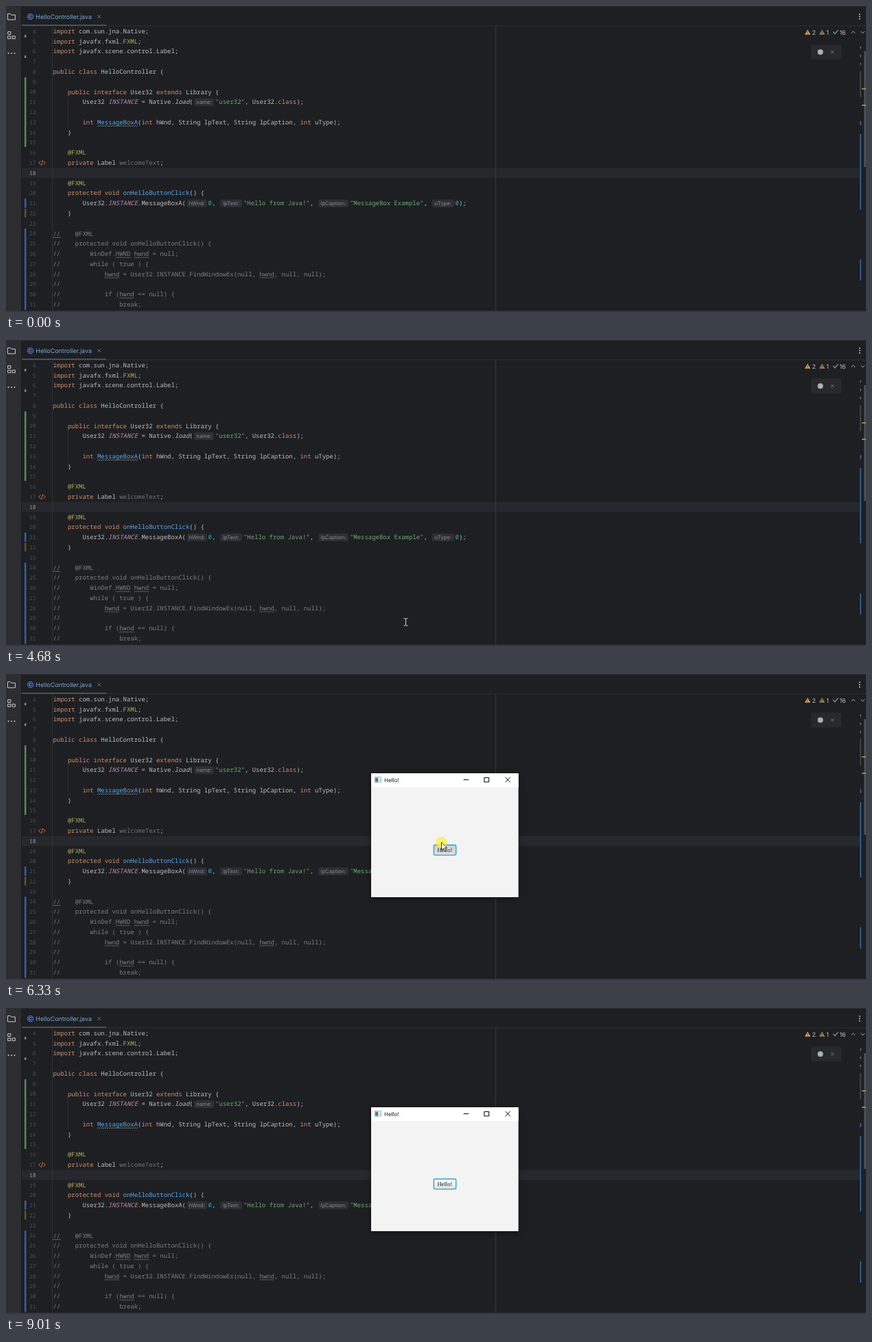
An HTML page for the animation above (9.76 s loop, 1253 by 447 pixels).

```html
<!DOCTYPE html>
<html lang="en">
<head>
<meta charset="utf-8">
<title>Message box demo</title>
<style>
  html, body { margin: 0; width: 100%; height: 100%; overflow: hidden; background: #1e1f22; }
  svg { display: block; width: 100vw; height: 100vh; }
  text { white-space: pre; text-rendering: geometricPrecision; }
  .code { font: 8.96px "Noto Sans Mono", "DejaVu Sans Mono", monospace; }
  .num { font: 7.9px "Noto Sans Mono", "DejaVu Sans Mono", monospace; text-anchor: end; }
  .ui { font-family: Inter, Roboto, sans-serif; }
  .win { font-family: "Open Sans", "Noto Sans", sans-serif; }
  .line { fill: none; stroke-linecap: round; stroke-linejoin: round; }
</style>
</head>
<body>
<svg id="stage" viewBox="0 0 1253 447" preserveAspectRatio="none" xmlns="http://www.w3.org/2000/svg"></svg>
<script>
const LOOP = 9760, STEP = 69, ANCHOR = 5500;
const CW = 5.376, X0 = 68.5;
const COLORS = {
  t: '#bcbec4', k: '#cf8e6d', s: '#6aab73', a: '#b3ae60', f: '#56a8f5',
  n: '#2aacb8', c: '#7a7e85', u: '#6f737a', p: '#c08bb8'
};
const esc = s => s.replace(/&/g, '&amp;').replace(/</g, '&lt;').replace(/>/g, '&gt;');
const mid = n => 37 + (n - 4) * 14.78;
const col = c => X0 + c * CW;

const rect = (x, y, w, h, fill, extra = '') =>
  `<rect x="${x}" y="${y}" width="${w}" height="${h}" fill="${fill}" ${extra}/>`;
const line = (d, stroke, w = 1, extra = '') =>
  `<path class="line" d="${d}" stroke="${stroke}" stroke-width="${w}" ${extra}/>`;
const label = (x, y, s, fill, size, cls = 'ui', extra = '') =>
  `<text class="${cls}" x="${x}" y="${y}" fill="${fill}" font-size="${size}" ${extra}>${esc(s)}</text>`;

// Code run: pairs of colour key and text; a capital key means italic.
function row(n, x, ...parts) {
  let out = '';
  for (let i = 0; i < parts.length; i += 2) {
    const key = parts[i], low = key.toLowerCase();
    out += `<tspan fill="${COLORS[low]}"${key !== low ? ' font-style="italic"' : ''}>${esc(parts[i + 1])}</tspan>`;
  }
  return `<text class="code" x="${x}" y="${mid(n) + 2.9}">${out}</text>`;
}
function chip(n, x, w, s) {
  return rect(x, mid(n) - 5.8, w, 11.6, '#2d2f34', 'rx="3"') +
    label(x + w / 2, mid(n) + 2.6, s, '#868a91', 7.7, 'ui', 'text-anchor="middle"');
}
function wave(n, x, w, color) {
  let d = `M${x} ${mid(n) + 6}`;
  for (let i = 1; i * 1.5 <= w; i++) d += `l1.5 ${i % 2 ? -1.5 : 1.5}`;
  return line(d, color, 0.75);
}

function editorCode() {
  const c4 = col(4), c8 = col(8);
  const comments = [
    [24, '//    @FXML'],
    [25, '//    protected void onHelloButtonClick() {'],
    [26, '//        WinDef.HWND hwnd = null;'],
    [27, '//        while ( true ) {'],
    [28, '//            hwnd = User32.INSTANCE.FindWindowEx(null, hwnd, null, null);'],
    [29, '//'],
    [30, '//            if (hwnd == null) {'],
    [31, '//                break;']
  ];
  const waves = [[26, 17], [26, 22], [28, 14], [28, 56], [30, 18]];
  return [
    row(4, X0, 'k', 'import ', 't', 'com.sun.jna.Native;'),
    row(5, X0, 'k', 'import ', 't', 'javafx.fxml.', 'a', 'FXML', 't', ';'),
    row(6, X0, 'k', 'import ', 't', 'javafx.scene.control.Label;'),
    row(8, X0, 'k', 'public class ', 't', 'HelloController {'),
    row(10, c4, 'k', 'public interface ', 't', 'User32 ', 'k', 'extends ', 't', 'Library {'),
    row(11, c8, 't', 'User32 ', 'P', 'INSTANCE', 't', ' = Native.', 'T', 'load', 't', '('),
    chip(11, 274, 29, 'name:'),
    row(11, 305, 's', '"user32"', 't', ', User32.', 'k', 'class', 't', ');'),
    row(13, c8, 'k', 'int ', 'f', 'MessageBoxA', 't', '(', 'k', 'int ', 't',
      'hWnd, String lpText, String lpCaption, ', 'k', 'int ', 't', 'uType);'),
    wave(13, col(12), 59, '#8f8b72'),
    row(14, c4, 't', '}'),
    row(16, c4, 'a', '@FXML'),
    row(17, c4, 'k', 'private ', 't', 'Label ', 'u', 'welcomeText', 't', ';'),
    row(19, c4, 'a', '@FXML'),
    row(20, c4, 'k', 'protected void ', 'f', 'onHelloButtonClick', 't', '() {'),
    row(21, c8, 't', 'User32.', 'P', 'INSTANCE', 't', '.MessageBoxA('),
    chip(21, 263.5, 29.5, 'hWnd:'),
    row(21, 294.5, 'n', '0', 't', ','),
    chip(21, 312, 32, 'lpText:'),
    row(21, 346, 's', '"Hello from Java!"', 't', ','),
    chip(21, 455, 44, 'lpCaption:'),
    row(21, 501, 's', '"MessageBox Example"', 't', ','),
    chip(21, 620.5, 32.5, 'uType:'),
    row(21, 654.5, 'n', '0', 't', ');'),
    row(22, c4, 't', '}'),
    ...comments.map(([n, s]) => row(n, X0, 'c', s)),
    line(`M${X0} ${mid(24) + 5.5}h10.5`, '#7d8060', 0.8),
    ...waves.map(([n, c]) => wave(n, col(c), 21.5, '#549159'))
  ].join('');
}

function gutter() {
  let out = '';
  for (let n = 4; n <= 31; n++)
    out += `<text class="num" x="43.5" y="${mid(n) + 2.8}" fill="${n === 18 ? '#a1a3ab' : '#4b5059'}">${n}</text>`;
  const bars = [
    [104, 102, '#549159'], [281, 14, '#375fad'], [296, 13, '#67551f'], [325, 119, '#375fad'],
    [42, 4, '#868a91'], [72, 4, '#868a91']
  ];
  for (const [y, h, c] of bars) out += rect(27, y, 2.4, h, c, 'rx="1"');
  return out +
    line('M50.3 226.6l-2.6 2.5 2.6 2.5M54.7 226.6l2.6 2.5 -2.6 2.5M53.5 225.6l-2 7', '#d0743c', 1);
}

function chrome() {
  const icon = '#ced0d6';
  const dots = pts => pts.map(([x, y]) => `<circle cx="${x}" cy="${y}" r="0.95" fill="${icon}"/>`).join('');
  const warn = (x, c) => `<path d="M${x} 34.4l4.2 7.4h-8.4z" fill="${c}"/>` +
    rect(x - 0.4, 37, 0.9, 2.4, '#1e1f22') + rect(x - 0.4, 40, 0.9, 0.8, '#1e1f22');
  return [
    rect(0, 0, 22, 447, '#2b2d30'),
    rect(22, 0, 1, 447, '#1a1b1d'),
    rect(0, 0, 1253, 1, '#2b2d30'),
    rect(23, 28.6, 1230, 0.8, '#313338'),
    rect(23, 27.3, 123, 1.7, '#4f5963'),
    rect(0, 445.2, 1253, 1.8, '#36383c'),
    // tool buttons
    line('M2.8 11.4h3.4l1.6 1.7h5.6v6.9h-10.6z', icon),
    line('M3 37.6h3.8v3.8h-3.8zM3 44h3.8v3.8h-3.8zM9.5 44h3.8v3.8h-3.8z', icon),
    dots([[3.5, 69], [8, 69], [12.5, 69]]),
    // tab
    '<circle cx="35.6" cy="15.6" r="4.3" fill="#25324d" stroke="#548af7" stroke-width="0.9"/>',
    line('M37.1 14.3a2 2 0 1 0 0 2.6', '#70a1f5', 0.9),
    label(43.3, 18.7, 'HelloController.java', '#79a8df', 8.9),
    line('M133.8 13.5l4 4M137.8 13.5l-4 4', '#868a91', 0.8),
    dots([[1243.7, 12], [1243.7, 15.5], [1243.7, 19]]),
    // inspections
    warn(1168, '#d3a664'), label(1174.5, 41.6, '2', '#bcbec4', 8.8),
    warn(1189, '#9c8458'), label(1195.3, 41.6, '1', '#bcbec4', 8.8),
    line('M1205.5 38.2l2.3 2.4 4.3 -5', '#57965c', 1.6),
    label(1214.5, 41.6, '16', '#bcbec4', 8.8),
    line('M1231.8 39.4l2.6 -2.5 2.6 2.5M1245.6 37.3l2.6 2.5 2.6 -2.5', '#b4b8bf', 0.9),
    // floating toolbar
    rect(1173, 56.5, 44, 21.5, '#27292d', 'rx="2"'),
    '<circle cx="1186.5" cy="67.3" r="4" fill="#a9b0ba"/>',
    line('M1202 65.2l4 4M1206 65.2l-4 4', '#868a91', 0.8),
    // stripe marks and scrollbar
    rect(1250, 66, 3, 169, '#4a4c50'),
    rect(1247, 120.3, 6, 1.5, '#c29a4f'), rect(1247, 144.3, 6, 1.5, '#c29a4f'),
    [59, 71, 83].map(y => rect(1244.3, y, 1.4, 3.4, '#6f737a')).join(''),
    rect(1244.4, 95, 1.2, 38, '#55585d'),
    [[168, 6], [187, 110], [370, 31]].map(([y, h]) => rect(1244.3, y, 1.4, h, '#3f6fa8')).join('')
  ].join('');
}

function appWindow() {
  return `<g id="app" style="filter:drop-shadow(0 2px 4px rgba(0,0,0,.45))">` +
    rect(532, 145, 214.6, 181, '#f3f3f3') +
    rect(532, 145, 214.6, 20.3, '#fff', 'id="appBar"') +
    rect(537.5, 150.6, 9, 7.6, '#fff', 'stroke="#8a949c" stroke-width="0.7"') +
    rect(538.2, 151.6, 4, 6, '#3f7f86') + rect(542.8, 152.2, 3, 4.8, '#cfdde2') +
    `<g id="appInk" fill="#000" stroke="#000">` +
    `<text class="win" x="551" y="157.6" font-size="8.1" stroke="none">Hello!</text>` +
    `<path class="line" d="M667 154.5h6.6M697.2 151.4h6.4v6.4h-6.4zM727.8 151.2l6.6 6.6M734.4 151.2l-6.6 6.6"/></g>` +
    `<g id="btnGroup">` +
    rect(623.3, 249.8, 32.4, 14.8, 'url(#btnUp)', 'id="btn" rx="2"') +
    `<text x="639.4" y="260" text-anchor="middle" font-size="8.6" font-family="'Liberation Serif',serif" fill="#222">Hello!</text></g></g>`;
}

function dialog() {
  return `<g id="box" style="filter:drop-shadow(0 1.5px 3px rgba(0,0,0,.5))">` +
    rect(592, 297, 106.3, 88, '#fff', 'stroke="#777" stroke-width="0.8"') +
    rect(592.4, 357, 105.5, 27.6, '#f0f0f0') +
    label(597, 310, 'MessageBox Example', '#000', 7.6, 'win') +
    line('M684.8 303.8l6.4 6.4M691.2 303.8l-6.4 6.4', '#111', 1) +
    label(598.8, 339.7, 'Hello from Java!', '#000', 7.6, 'win') +
    rect(639.2, 364.2, 47.6, 13, '#e1e1e1', 'stroke="#0078d7" stroke-width="1.6"') +
    `<text x="663" y="373.4" text-anchor="middle" font-size="7.8" fill="#000" font-family="'Noto Sans CJK KR','Noto Sans CJK',sans-serif">확인</text></g>`;
}

const cursors =
  '<circle id="glow" r="8.2" fill="#fbf04a" opacity="0.8"/>' +
  '<path id="arrow" d="M0 0v11l2.6 -2.4 1.8 4 1.9 -.8 -1.8 -3.9h3.4z" fill="#fff" stroke="#111" stroke-width="0.8" stroke-linejoin="round"/>' +
  '<path id="beam" class="line" d="M-2.6 -5.2h1.8l.8 .5 .8 -.5h1.8M0 -4.7v9.4M-2.6 5.2h1.8l.8 -.5 .8 .5h1.8" stroke="#d8d8d8" stroke-width="1"/>';

document.getElementById('stage').innerHTML =
  '<defs><linearGradient id="btnUp" x2="0" y2="1"><stop stop-color="#fdfdfd"/><stop offset="1" stop-color="#dedede"/></linearGradient>' +
  '<linearGradient id="btnDown" x2="0" y2="1"><stop stop-color="#d0d0d0"/><stop offset="1" stop-color="#dcdcdc"/></linearGradient></defs>' +
  rect(0, 0, 1253, 447, '#1e1f22') +
  rect(23, 236.5, 1221, 14.8, '#26282e') +
  rect(67, 30, 0.9, 415, '#313438') +
  rect(713, 30, 0.9, 415, '#393b40') +
  rect(90, 133, 0.8, 44, '#303237') +
  gutter() + editorCode() + chrome() + appWindow() + dialog() + cursors;

const el = {};
for (const id of ['app', 'appBar', 'appInk', 'btnGroup', 'btn', 'box', 'glow', 'arrow', 'beam'])
  el[id] = document.getElementById(id);

// Pointer routes: time, x, y. The pointer is hidden between routes.
const ROUTES = [
  { end: 150, keys: [[70, 1144, 431]] },
  { end: 2190, keys: [[1790, 768, 438], [1900, 705, 330], [1990, 645, 264], [2090, 575, 340], [2190, 519, 446]] },
  { end: 9010, keys: [
    [2340, 634, 445], [2460, 628, 433], [2680, 628, 433], [2750, 629, 429], [2870, 625.6, 436.5],
    [3200, 625.6, 436.5], [3470, 622.5, 443], [3670, 622.5, 443], [3740, 618, 443.5],
    [4200, 618, 443.5], [4340, 598, 433], [4540, 598, 433], [4672, 582.5, 412],
    [4850, 560, 398], [5100, 535, 386], [5400, 518.5, 381], [5500, 517, 380], [5570, 517, 379],
    [5700, 524, 368], [5900, 570, 320], [6100, 622, 262], [6260, 634.5, 246], [6480, 634.5, 246],
    [6700, 633, 253], [6900, 631, 266], [7200, 631, 266], [7510, 633, 260],
    [7750, 640, 290], [7950, 655, 345], [8100, 663, 369], [8390, 663, 369],
    [8470, 690, 371], [8540, 745, 362], [8610, 775, 357], [8670, 803, 354],
    [8800, 803, 354], [8870, 880, 380], [8940, 974, 403]] }
];
const clamp = v => Math.max(0, Math.min(1, v));

function pointerAt(t, q) {
  const route = ROUTES.find(r => t >= r.keys[0][0] && t < r.end);
  if (!route) return null;
  const k = route.keys;
  const i = k.findIndex(p => p[0] > q);
  if (i === 0) return k[0].slice(1);
  if (i < 0) return k[k.length - 1].slice(1);
  const [t0, x0, y0] = k[i - 1], [t1, x1, y1] = k[i];
  const f = (q - t0) / (t1 - t0);
  return [x0 + (x1 - x0) * f, y0 + (y1 - y0) * f];
}

function fade(node, alpha, scale, cx, cy) {
  node.setAttribute('display', alpha > 0 ? 'inline' : 'none');
  node.setAttribute('opacity', alpha);
  node.setAttribute('transform', `translate(${cx} ${cy}) scale(${scale}) translate(${-cx} ${-cy})`);
}
const show = (node, on, x = 0, y = 0) => {
  node.setAttribute('display', on ? 'inline' : 'none');
  node.setAttribute('transform', `translate(${x} ${y})`);
};
const inside = ([x, y], l, t, r, b) => x > l && x < r && y > t && y < b;
const growth = p => 0.9 + 0.1 * (1 - Math.pow(1 - p, 2.4));

function draw(t) {
  const q = Math.max(0, ANCHOR + Math.floor((t - ANCHOR) / STEP) * STEP);

  const open = clamp((q - 5418) / 220);
  fade(el.app, open, growth(open), 632, 235.4);
  el.appBar.setAttribute('fill', open < 0.6 ? '#dcdcdc' : '#fff');

  const boxIn = clamp((q - 6860) / 170), boxOut = clamp((q - 8400) / 110);
  const solid = q >= 7080 ? 1 : 0.93;
  fade(el.box, boxIn * solid * (1 - boxOut), growth(boxIn) - 0.06 * boxOut, 645, 341);

  const idle = q >= 6860 && q < 8600;
  const pressed = t >= 6260 && t < 6480;
  const ink = idle ? '#999' : '#000';
  el.appInk.setAttribute('fill', ink);
  el.appInk.setAttribute('stroke', ink);
  el.btnGroup.setAttribute('display', open === 1 ? 'inline' : 'none');
  el.btn.setAttribute('fill', pressed ? 'url(#btnDown)' : 'url(#btnUp)');
  el.btn.setAttribute('stroke', idle ? '#b5b5b5' : '#2ba5cf');
  el.btn.setAttribute('stroke-width', idle ? 0.8 : 1.4);

  const p = pointerAt(t, q);
  const overApp = p && open > 0 && inside(p, 532, 145, 747, 326);
  const overBox = p && boxIn > 0 && boxOut < 1 && inside(p, 592, 297, 698, 385);
  const arrow = overApp || overBox;
  const [x, y] = p || [0, 0];
  show(el.arrow, arrow, x, y);
  show(el.beam, p && !arrow, x, y);
  show(el.glow, p && (pressed || (t >= 8250 && t < 8390)), x, y);
}

function tick(now) {
  draw(now % LOOP);
  requestAnimationFrame(tick);
}
draw(0);
requestAnimationFrame(tick);
</script>
</body>
</html>
```
